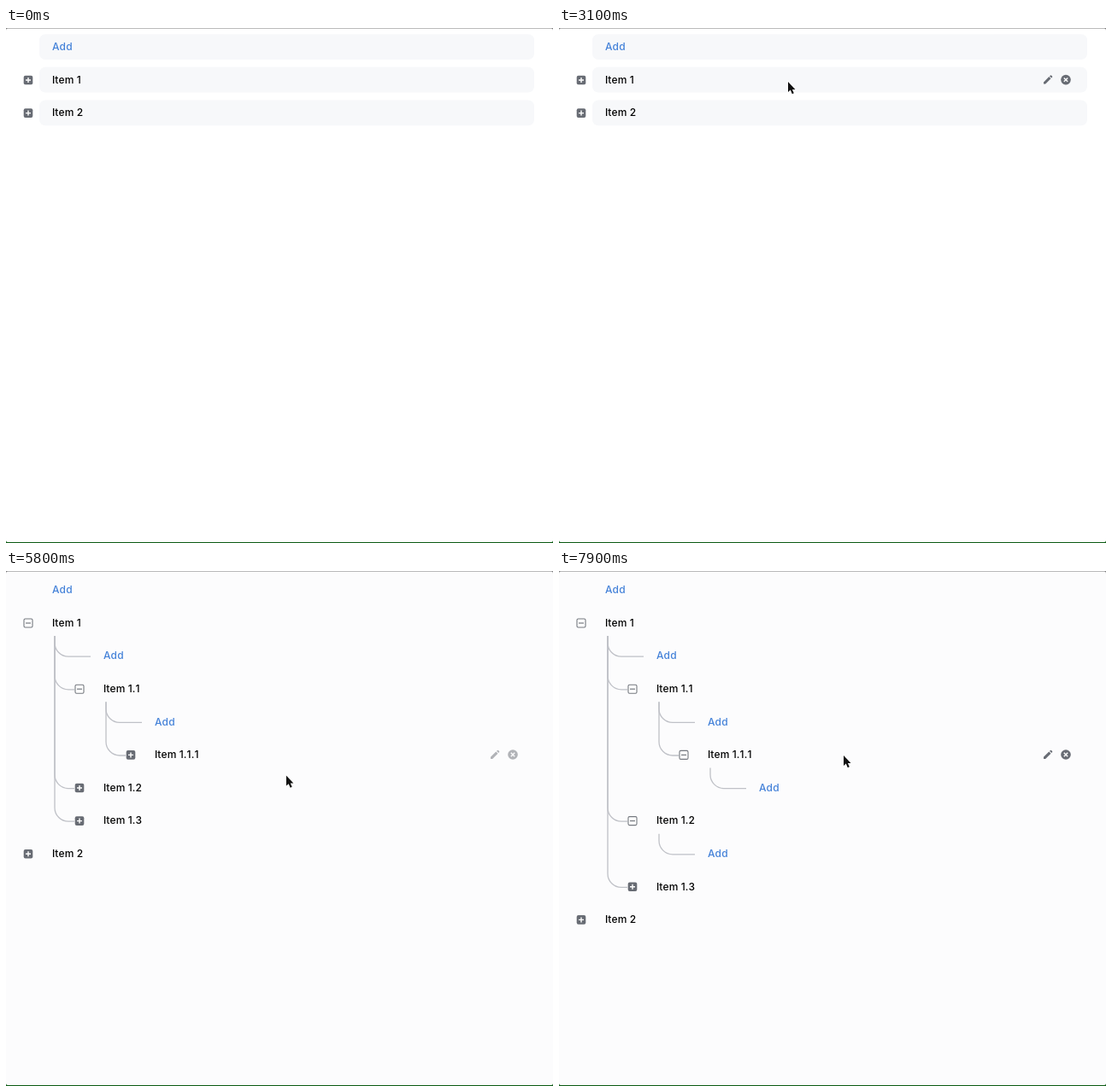
Write an HTML page that moves like this. It is 640 by 603 pixels and loops after 8 s.

```html
<!DOCTYPE html>
<html lang="en">
<head>
<meta charset="utf-8">
<title>Tree list</title>
<style>
html, body { margin: 0; width: 100%; height: 100%; overflow: hidden; background: #fff; }
svg { display: block; width: 100%; height: 100%; }
text { font: 500 12px Inter, Arial, sans-serif; font-kerning: none; letter-spacing: .1px; fill: #000; }
.add { fill: #4683d9; }
.line { fill: none; stroke: #bfc1c7; stroke-width: 1.3; }
.icon { fill: #686c74; }
.mark { fill: none; stroke: #fff; stroke-width: 1.4; }
.box { fill: #fff; stroke: #74787f; stroke-width: 1.1; }
.dash { stroke: #74787f; stroke-width: 1.2; }
.arrow { fill: #111; stroke: #fff; stroke-width: 1.6; paint-order: stroke; }
.hand { fill: #fff; stroke: #222; stroke-width: 1.1; stroke-linejoin: round; }
</style>
</head>
<body>
<svg id="stage" viewBox="0 0 640 603"></svg>
<script>
const LOOP = 8000, TOP = 22, PITCH = 38.6, INDENT = 60, LEFT = 39, RIGHT = 618;
const stage = document.getElementById('stage');
const clamp = v => Math.min(1, Math.max(0, v));
const ease = k => k * k * (3 - 2 * k);

const item = (name, opens = Infinity, kids = []) => ({ name, opens, kids });
const deep = item('1.1.1', 7500);
const first = item('1.1', 4900, [deep]);
const second = item('1.2', 6300);
const tree = [item('1', 3300, [first, second, item('1.3')]), item('2')];

// Eased pointer moves: start, end, x, y.
const enter = { at: 100, x: 325, y: 462 };
const moves = [
  [100, 300, 318, 149],
  [450, 880, 298, 134],
  [900, 1180, 273, 27],
  [1350, 1750, 290, 156],
  [1800, 2100, 272, 26],
  [2480, 3000, 268, 62],
  [3850, 4500, 318, 138],
  [5400, 5900, 329, 250],
  [6600, 7350, 333, 215]
];

function pointer(t) {
  if (t < enter.at) return null;
  let { x, y } = enter;
  for (const [from, to, toX, toY] of moves) {
    const k = ease(clamp((t - from) / (to - from)));
    x += (toX - x) * k;
    y += (toY - y) * k;
  }
  return { x, y };
}

function layout(t) {
  const rows = [];
  const place = (name, depth, parent, add, open) => {
    const row = { name, parent, add, open, x: LEFT + depth * INDENT, y: TOP + rows.length * PITCH };
    rows.push(row);
    return row;
  };
  const walk = (list, depth, parent) => {
    place('add' + (parent ? parent.name : ''), depth, parent, true);
    for (const it of list) {
      const row = place(it.name, depth, parent, false, t >= it.opens);
      if (row.open) walk(it.kids, depth + 1, row);
    }
  };
  walk(tree, 0, null);
  return rows;
}

function hovered(t, rows = layout(t)) {
  const p = pointer(t);
  const row = p && rows.find(r => Math.abs(p.y - r.y) < 15 && p.x > r.x);
  return row ? row.name : null;
}

// Row buttons fade with the time spent on the row during the last 250 ms.
function fades(t) {
  const spent = {}, level = {};
  for (let ago = 5; ago < 250; ago += 10) {
    const name = hovered(t - ago);
    spent[name] = (spent[name] || 0) + 10;
  }
  for (const name in spent) level[name] = clamp((spent[name] - 60) / 60);
  return level;
}

function drawLink({ parent, add, x, y }) {
  const from = parent.x + 18, end = add ? x : x - 19;
  return `<path class="line" d="M${from} ${parent.y + 15.5}V${y - 15}a16 16 0 0 0 16 16H${end}"/>`;
}

function drawToggle({ x, y, open }) {
  return `<g transform="translate(${x - 13} ${y + .4})">` + (open
    ? '<rect class="box" x="-5" y="-5" width="10" height="10" rx="1.5"/><path class="dash" d="M-3 0H3"/>'
    : '<rect class="icon" x="-5.3" y="-5.3" width="10.6" height="10.6" rx="2"/><path class="mark" d="M-3 0H3M0 -3V3"/>') + '</g>';
}

function drawButtons(y, opacity) {
  return `<g transform="translate(0 ${y})" opacity="${opacity}">
    <path class="icon" d="M567 5V2.8L573.3 -3.5L575.5 -1.3L569.2 5ZM574 -4.2L575 -5.1Q575.5 -5.5 576 -5.1L577.1 -4Q577.5 -3.5 577.1 -3L576.2 -2Z"/>
    <circle class="icon" cx="593" r="5.8"/>
    <path class="mark" d="M590.8 -2.2L595.2 2.2M595.2 -2.2L590.8 2.2"/></g>`;
}

function drawRow(row, flat, over, opacity) {
  const { name, add, y } = row, x = row.x + 15;
  let s = flat ? '' : `<rect x="${row.x}" y="${y - 14.8}" width="${RIGHT - row.x}" height="29.8" rx="7" fill="#f7f8fa"/>`;
  s += `<text x="${x}" y="${y + 4.1}"${add ? ' class="add"' : ''}>${add ? 'Add' : 'Item ' + name}</text>`;
  if (add && over) s += `<path d="M${x} ${y + 5.6}h22" stroke="#4683d9"/>`;
  if (!add) s += drawToggle(row);
  if (!add && opacity) s += drawButtons(y, opacity);
  return s;
}

function drawPointer(p, hand) {
  if (!p) return '';
  return hand
    ? `<g class="hand" transform="translate(${p.x - 4} ${p.y})"><path d="M4.2 9.5L2.6 3Q2.3 1 3.8 .8Q5 .8 5.5 2.4L6.6 5.6Q8.2 4.6 9 6Q10.6 5.3 11.2 6.8Q13 6.4 13.6 8L14.3 11Q14.4 13 13.3 14.5L13 16.5H6.5Q5.8 14.5 3.5 12.8L.8 10.2Q.5 8.6 2 8.6Z"/><path stroke-width=".8" d="M7.5 10.5l.4 3M9.5 10.5l.3 3M11.5 10.5l.2 3"/></g>`
    : `<path class="arrow" transform="translate(${p.x} ${p.y + 1})" d="M0 0V12L2.8 9.6L4.8 14.2L6.8 13.3L4.9 8.9H8.5Z"/>`;
}

function render(t) {
  const rows = layout(t), over = hovered(t, rows), level = fades(t);
  const flat = t >= first.opens && t < second.opens || t >= deep.opens;
  stage.innerHTML = '<path fill="#0b5a12" d="M0 590H640V603H0Z"/><path fill="#777" d="M0 0H640V9H0Z"/>' +
    `<rect y=".6" width="640" height="601.4" rx="2" fill="${flat ? '#fcfcfd' : '#fff'}"/>` +
    rows.map(r => drawRow(r, flat, r.name === over, level[r.name])).join('') +
    rows.filter(r => r.parent).map(drawLink).join('') +
    drawPointer(pointer(t), over && over.startsWith('add'));
}

const start = performance.now();
function tick() {
  render((performance.now() - start) % LOOP);
  requestAnimationFrame(tick);
}
tick();
</script>
</body>
</html>
```
